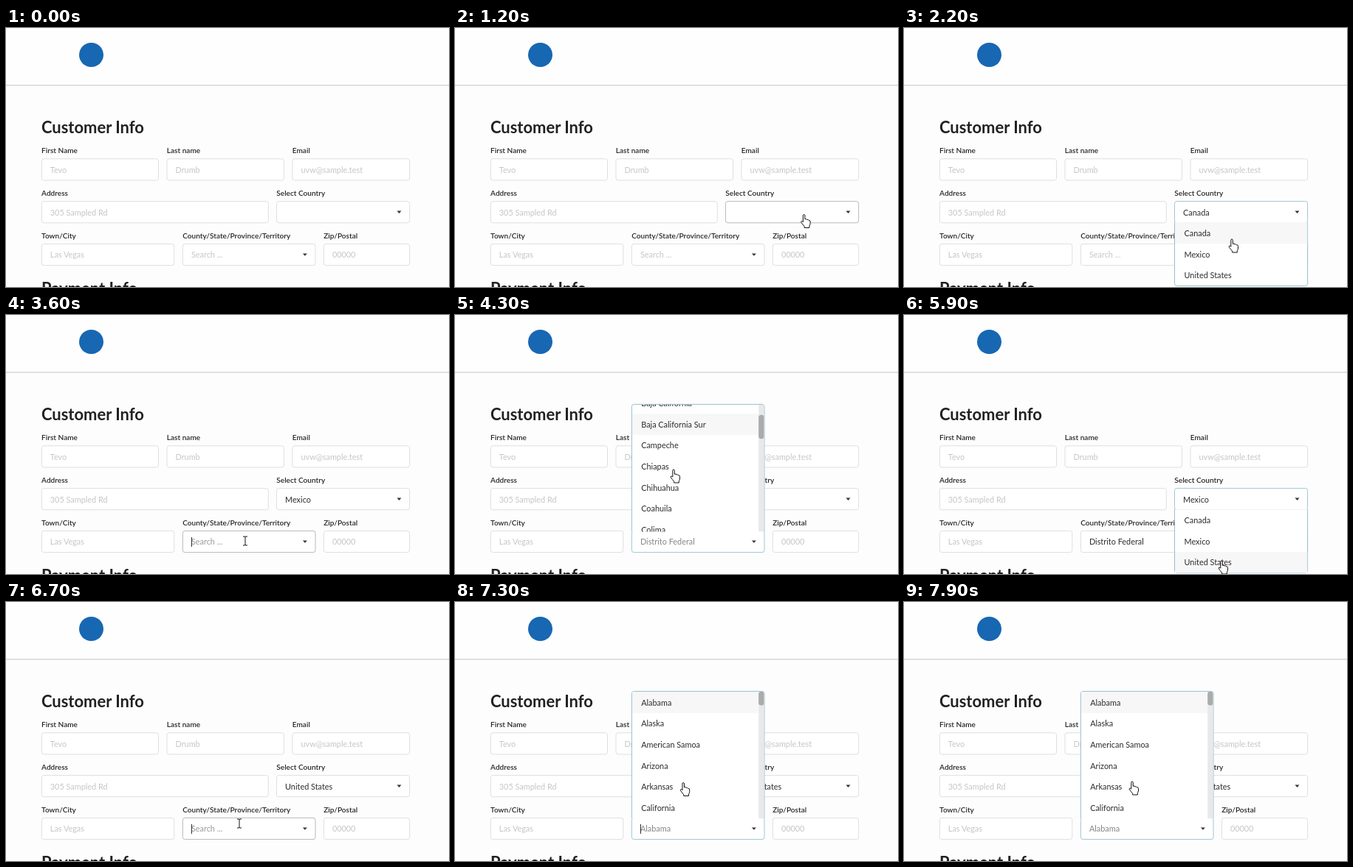
An HTML page for the animation above (8 s loop, 600 px wide and 352 px high).

```html
<!DOCTYPE html>
<html lang="en">
<head>
<meta charset="utf-8">
<title>Customer form</title>
<style>
  html, body { margin: 0; width: 100%; height: 100%; overflow: hidden; background: #fdfdfd; }
  svg { display: block; width: 600px; height: 352px; font-family: Lato, sans-serif; font-size: 10.88px; }
  .title { font-size: 21.95px; font-weight: 700; fill: #212121; }
  .label { font-size: 10.08px; font-weight: 600; fill: #262626; }
  .hint { fill: #c6c6c6; }
  .item { fill: #2c2c2c; }
  .box { fill: #fff; stroke: #dcdcdf; stroke-width: .9; }
  .menu { fill: #fff; stroke: #96c0d0; stroke-width: 1; }
  .arrow { fill: #333; }
  .pointer { fill: #fff; stroke: #111; stroke-width: 1; stroke-linejoin: round; }
</style>
</head>
<body>
<svg id="stage" viewBox="0 0 600 352"></svg>
<script>
const LOOP = 8000, ROW = 28.6, FIELD_H = 29.2, SLIDE = 200;
const stage = document.getElementById('stage');
const clamp = v => Math.min(1, Math.max(0, v));

// x, y, width, label, placeholder
const fields = {
  first:   [48.3, 177.8, 158.2, 'First Name', 'Tevo'],
  last:    [218, 177.8, 158.6, 'Last name', 'Drumb'],
  email:   [388, 177.8, 158.6, 'Email', 'uvw@sample.test'],
  address: [48.3, 235.6, 307, 'Address', '305 Sampled Rd'],
  country: [366.5, 235.6, 180.1, 'Select Country', ''],
  town:    [48.3, 293.4, 179.5, 'Town/City', 'Las Vegas'],
  state:   [239.4, 293.4, 179.6, 'County/State/Province/Territory', 'Search ...'],
  zip:     [430.4, 293.4, 116.2, 'Zip/Postal', '00000'],
};

const countries = ['Canada', 'Mexico', 'United States'];
const regions = {
  mexico: { total: 32, names: ['Distrito Federal', 'Aguascalientes', 'Baja California', 'Baja California Sur',
    'Campeche', 'Chiapas', 'Chihuahua', 'Coahuila', 'Colima'] },
  usa: { total: 56, names: ['Alabama', 'Alaska', 'American Samoa', 'Arizona', 'Arkansas', 'California', 'Colorado'] },
};

// Steps: [start time, value]
const countryValue = [[0, ''], [1600, 'Canada'], [2900, 'Mexico'], [5950, 'United States']];
const stateValue = [[0, ''], [3720, 'Distrito Federal'], [5950, ''], [6820, 'Alabama']];
const countryRow = [[0, 0], [2450, 1], [5750, 2]];
const stateRow = [[0, 0], [4050, 3], [4400, 5], [4950, -1], [6000, 0]];

// Spans: [start, end]
const countryOpen = [[1500, 2900], [5500, 5950]];
const stateOpen = [[3650, 5300], [6750, 9000]];
const stateFocus = [[3550, 5300], [6650, 9000]];
const caretOn = [[3550, 4080], [4610, 5250], [6650, 7180], [7300, 7830]];

// Pointer hot spot: [time, x, y]
const path = [
  [650, 566, 299], [1100, 480, 254], [1400, 452, 252], [1700, 450, 253], [2100, 444, 287], [2300, 444, 287],
  [2600, 436, 308], [3250, 436, 308], [3550, 324, 307], [3680, 324, 307], [4050, 296, 210], [4450, 296, 210],
  [4850, 300, 206], [5180, 548, 236], [5300, 548, 238], [5480, 470, 252], [5560, 468, 254], [5850, 430, 334],
  [6000, 430, 334], [6380, 317, 302], [6600, 317, 302], [6700, 316, 301], [6850, 316, 301], [7350, 309, 244], [8000, 309, 244],
];

const shapes = {
  arrow: 'M0 0V14.2L3.3 11.2L5.7 16.6L8 15.6L5.6 10.4H10Z',
  hand: 'M-1.2 1.5Q-1.2 0 0 0Q1.3 0 1.3 1.5V6.3Q3.4 5.5 4 7Q5.7 6.3 6.3 7.8Q8.5 7.4 8.5 9.5V12Q8.5 14 7.3 15.6V18H.6V16.3Q-1.6 13.5 -3.7 10.8Q-4.3 9.3 -3.1 9Q-2.1 8.9 -1.2 10.2Z',
  text: 'M-3 -6H-1Q0 -6 0 -5Q0 -6 1 -6H3M0 -5V5M-3 6H-1Q0 6 0 5Q0 6 1 6H3',
};

const text = (x, y, s, cls, extra = '') => `<text x="${x}" y="${y}" class="${cls}" ${extra}>${s}</text>`;

function fieldMarkup(id) {
  const [x, y, w, label, hint] = fields[id];
  const drop = id === 'country' || id === 'state';
  const ax = x + w - 14.1, ay = y + 13;
  return text(x - .2, y - 7.5, label, 'label') +
    `<rect id="${id}Box" class="box" x="${x}" y="${y}" width="${w}" height="${FIELD_H}" rx="3"/>` +
    text(x + 11.5, y + 18.9, hint, 'hint', `id="${id}Text"`) +
    (drop ? `<path class="arrow" d="M${ax - 3} ${ay}h6l-3 3.4z"/>` : '');
}

stage.innerHTML = `
  <defs><clipPath id="listClip"><rect x="239.8" y="121.8" width="178.8" height="172.6"/></clipPath></defs>
  <rect width="600" height="77" fill="#fefefe"/>
  <rect y="77" width="600" height="1.6" fill="#d7d9df"/>
  <circle cx="115.5" cy="36.5" r="16.5" fill="#1767b3"/>
  ${text(48, 143, 'Customer Info', 'title')}
  ${text(48, 362.2, 'Payment Info', 'title')}
  ${Object.keys(fields).map(fieldMarkup).join('')}
  <g id="countryMenu">
    <path class="menu" d="M366.5 264.2V347.3q0 3 3 3H543.6q3 0 3-3V264.2"/>
    <rect id="countryMark" x="367" width="179.2" height="${ROW}" fill="#f7f7f7"/>
    ${countries.map((s, i) => text(379.5, 283 + i * ROW, s, 'item')).join('')}
  </g>
  <g id="stateMenu">
    <path class="menu" d="M239.4 294.4V124.4q0-3 3-3H416q3 0 3 3V294.4"/>
    <g clip-path="url(#listClip)">
      <g id="list">
        <rect id="stateMark" x="239.8" width="171.4" height="${ROW}" fill="#f7f7f7"/>
        <g id="items"></g>
      </g>
      <rect x="411.2" y="121.8" width="7.4" height="172.6" fill="#e9e9e9"/>
      <rect id="thumb" x="411.2" width="7.4" rx="3.5" fill="#ababab"/>
    </g>
  </g>
  <path id="caret" d="M251.4 302v13" stroke="#222" stroke-width="1"/>
  <path id="pointer" class="pointer"/>`;

const el = {};
stage.querySelectorAll('[id]').forEach(n => el[n.id] = n);
const set = (id, attrs) => { for (const k in attrs) el[id].setAttribute(k, attrs[k]); };

const at = (steps, t) => steps.filter(s => s[0] <= t).pop()[1];
const within = (spans, t) => spans.some(([a, b]) => t >= a && t < b);
const openness = (spans, t) => Math.max(...spans.map(([a, b]) =>
  Math.min(clamp((t - a) / SLIDE), 1 - clamp((t - b) / SLIDE))));

function pointerAt(t) {
  const i = path.findIndex(p => p[0] > t);
  if (i < 1) return null;
  const [t0, x0, y0] = path[i - 1], [t1, x1, y1] = path[i];
  const p = (t - t0) / (t1 - t0), e = p * p * (3 - 2 * p);
  return [x0 + (x1 - x0) * e, y0 + (y1 - y0) * e];
}

function fieldUnder([px, py]) {
  return Object.keys(fields).find(id => {
    const [x, y, w] = fields[id];
    return px >= x && px <= x + w && py >= y && py <= y + FIELD_H;
  });
}

function inMenu([x, y], country, state) {
  return (country && x > 366 && x < 547 && y > 264 && y < 351) ||
    (state && x > 239 && x < 419 && y > 121 && y < 294);
}

function slide(id, amount, origin) {
  const e = 1 - (1 - amount) ** 2;
  set(id, { opacity: e, transform: `translate(0 ${origin * (1 - e)}) scale(1 ${e})`,
    visibility: amount > 0 ? 'visible' : 'hidden' });
}

let shownRegion;
function showRegion(key) {
  if (key === shownRegion) return;
  shownRegion = key;
  el.items.innerHTML = regions[key].names.map((s, i) => text(252.2, 140.8 + i * ROW, s, 'item')).join('');
}

function render(t) {
  const country = openness(countryOpen, t), state = openness(stateOpen, t);
  const focus = within(stateFocus, t);
  const pos = pointerAt(t);
  const overMenu = pos && inMenu(pos, country > 0, state > 0);
  const under = pos && !overMenu ? fieldUnder(pos) : null;

  for (const id in fields) {
    const open = id === 'country' ? within(countryOpen, t) : id === 'state' && within(stateOpen, t);
    const dark = id === under || (id === 'state' && focus);
    el[id + 'Box'].style.stroke = open ? '#96c0d0' : dark ? '#b0b2b4' : '';
  }

  el.countryText.textContent = at(countryValue, t);
  el.countryText.style.fill = '#2c2c2c';
  const chosen = at(stateValue, t);
  el.stateText.textContent = chosen || fields.state[4];
  el.stateText.style.fill = focus ? (chosen ? '#858585' : '#999') : chosen ? '#2c2c2c' : '';

  slide('countryMenu', country, 264.5);
  slide('stateMenu', state, 294);
  set('countryMark', { y: 264.7 + at(countryRow, t) * ROW });

  const key = t < 6000 ? 'mexico' : 'usa';
  showRegion(key);
  const scroll = key === 'mexico' ? 77.3 * (1 - (1 - clamp((t - 4125) / 275)) ** 3) : 0;
  const ratio = 172.6 / (regions[key].total * ROW);
  const row = at(stateRow, t);
  set('list', { transform: `translate(0 ${-scroll})` });
  set('stateMark', { y: 122.2 + row * ROW, visibility: row < 0 ? 'hidden' : 'inherit' });
  set('thumb', { y: 121.8 + scroll * ratio, height: 172.6 * ratio });

  set('caret', { visibility: within(caretOn, t) ? 'visible' : 'hidden' });
  set('pointer', { visibility: pos ? 'visible' : 'hidden' });
  if (pos) {
    const kind = overMenu || under === 'country' ? 'hand' : under ? 'text' : 'arrow';
    set('pointer', { d: shapes[kind], transform: `translate(${pos[0]} ${pos[1]})`,
      'fill-opacity': kind === 'text' ? 0 : 1 });
  }
}

const start = performance.now();
function tick() {
  render((performance.now() - start) % LOOP);
  requestAnimationFrame(tick);
}
tick();
</script>
</body>
</html>
```
